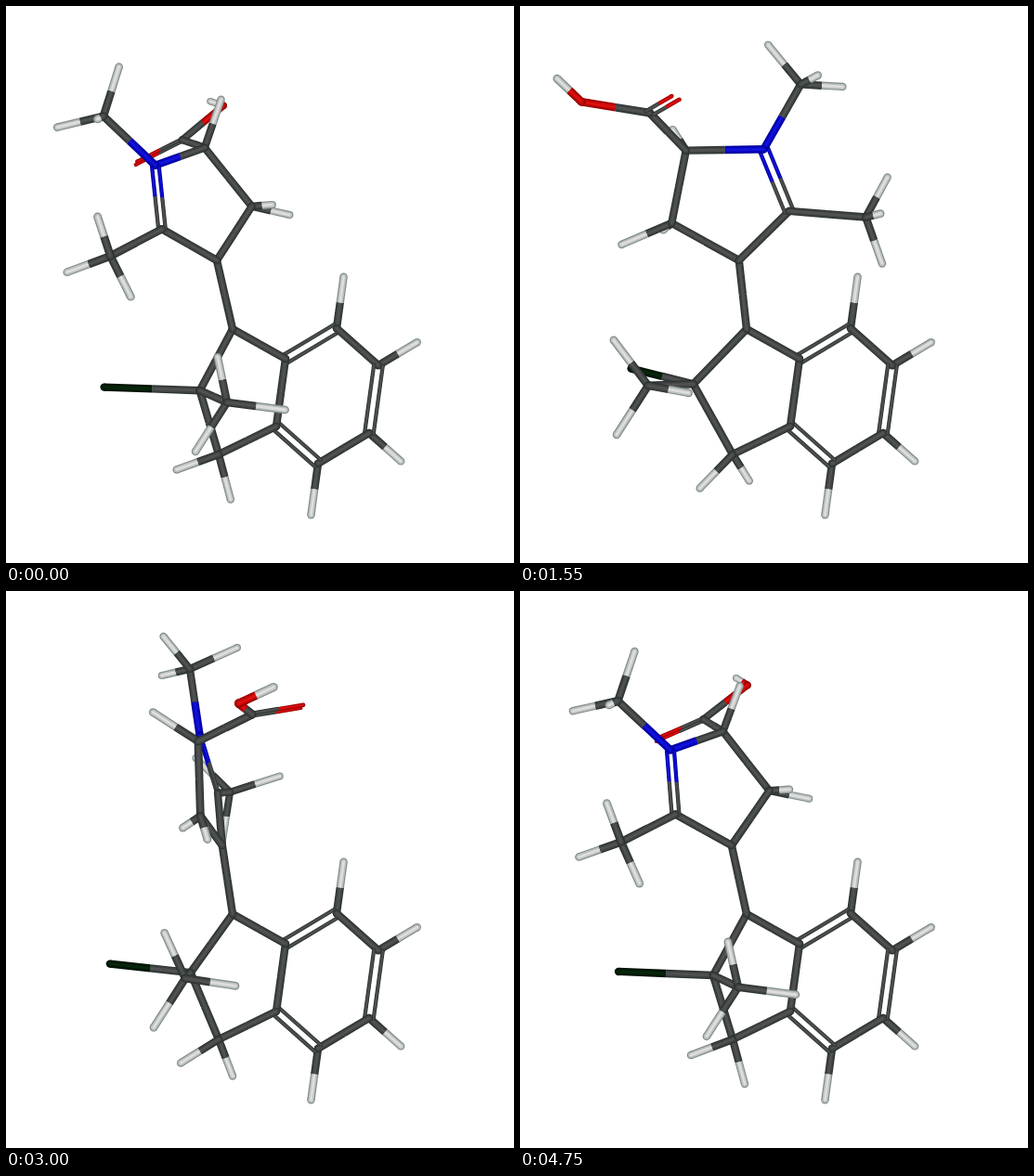
Animation, 547 px wide and 600 px high, one loop 4800 ms. Source, as an HTML page with a canvas:

```html
<!DOCTYPE html>
<html lang="en">
<head>
<meta charset="utf-8">
<title>Rotating molecule</title>
<style>
  html, body { margin: 0; width: 100%; height: 100%; overflow: hidden; background: #fff; }
  canvas { display: block; }
</style>
</head>
<body>
<canvas id="stage" width="547" height="600"></canvas>
<script>
const ctx = document.getElementById("stage").getContext("2d");
const LOOP = 4800, STEP = 50, RAD = Math.PI / 180;

// Edge, body and highlight colours
const paint = {
  C: ["#2b3232", "#404343", "#505252"],
  H: ["#7f8c8c", "#bec0c0", "#dedede"],
  N: ["#000098", "#0606c0", "#1212da"],
  O: ["#900000", "#c00505", "#dc1010"],
  Cl: ["#001004", "#021a06", "#08260c"]
};

// Key points of the few motions that drive the whole molecule
const keyTimes = [0, 1150, 1900, 2500, 3500, 4050];
const motions = {
  drift: [-1, 23, 11, -2, -2, 14],              // degrees ahead of an even turn
  roll: [-0.45, 0.12, -0.05, -0.2, -0.18, -0.06], // lean of the upper ring
  sway: [-17, -6, -11, -14, -5, 4],             // foot of the upper ring
  tilt: [0.2, 0, 0.85, 0.4, 0.25, 1],           // acid group, low to high
  flexX: [103, 25, 0, 61, 33, 12],              // methyl group of the lower ring
  flexY: [427, 404, 416, 429, 405, 414]
};

// Smooth periodic curve through the key points
function curve(values, t) {
  const n = values.length;
  const time = i => keyTimes[(i + n) % n] + LOOP * Math.floor(i / n);
  const value = i => values[(i + n) % n];
  const slope = i => {
    const before = time(i) - time(i - 1), after = time(i + 1) - time(i);
    return ((value(i) - value(i - 1)) / before * after +
            (value(i + 1) - value(i)) / after * before) / (before + after);
  };
  let i = n - 1;
  while (keyTimes[i] > t) i--;
  const span = time(i + 1) - time(i), s = (t - time(i)) / span;
  const ease = s * s * (3 - 2 * s);
  return value(i) + (value(i + 1) - value(i)) * ease +
    span * s * (1 - s) * (slope(i) * (1 - s) - slope(i + 1) * s);
}

function motionAt(t) {
  const m = {};
  for (const name in motions) m[name] = curve(motions[name], t);
  m.turn = (222 + 360 * t / LOOP + m.drift) * RAD;
  return m;
}

const atoms = [], element = {}, bonds = [];
const bond = (a, b, ref) => bonds.push({ a, b, ref });

// ref names a third atom in the plane of a double bond
function atom(name, kind, parent, place, ref) {
  atoms.push({ name, parent, place });
  element[name] = kind;
  if (parent) bond(parent, name, ref);
}

// Placement rules, each relative to the parent atom
const fixed = (x, y) => () => [x, y, 0];
const flexing = (x, y, z, gainX = 0, gainY = 0) => m =>
  [x + gainX * m.flexX, y + gainY * m.flexX, z];
const turning = (u, v, w, lift = 0) => m => {
  const c = Math.cos(m.turn), s = Math.sin(m.turn);
  const x = u * c + w * s, y = v + lift * m.tilt;
  const cr = Math.cos(m.roll), sr = Math.sin(m.roll);
  return [x * cr + y * sr, x * sr - y * cr, w * c - u * s];
};

// Three hydrogens around the outward direction (u, v)
function methyl(parent, u, v, phase) {
  for (let i = 0; i < 3; i++) {
    const angle = (phase + 120 * i) * RAD, across = 54 * Math.cos(angle);
    atom(parent + i, "H", parent,
      turning(19 * u + across * v, 19 * v - across * u, 54 * Math.sin(angle)));
  }
}

// Benzene ring: a hexagon seen at an angle
const hexagon = (i, k) => {
  const c = k * Math.cos(i * 60 * RAD), s = k * Math.sin(i * 60 * RAD);
  return [-45 * c + 37.5 * s, -40 * c - 61 * s];
};
for (let i = 0; i < 6; i++) {
  const [x, y] = hexagon(i, 1);
  atom("r" + i, "C", "", fixed(346 + x, 420 + y));
  if (i > 0 && i < 5) atom("h" + i, "H", "r" + i, fixed(...hexagon(i, 0.76)));
}
for (let i = 0; i < 6; i++)
  bond("r" + i, "r" + (i + 1) % 6, i % 2 ? "" : "r" + (i + 2) % 6);

// Lower ring
atom("hub", "C", "", fixed(244, 348));
atom("q", "C", "", flexing(186, 407, 0, 0.22, 0.07));
atom("b", "C", "", fixed(229, 483));
atom("cl", "Cl", "q", flexing(-66, -17, -25, -0.36, 0.13));
atom("m", "C", "", m => [135 + m.flexX, m.flexY, 45]);
atom("m0", "H", "m", flexing(-38, -49, 10, 0.27));
atom("m1", "H", "m", flexing(43, 8, 20, 0.19));
atom("m2", "H", "m", flexing(-34, 53, 10));
atom("b0", "H", "b", flexing(-35, 37, 20, -0.1, -0.2));
atom("b1", "H", "b", flexing(18, 28, -15, -0.05, 0.2));
bond("hub", "r0");
bond("hub", "q");
bond("q", "m");
bond("q", "b");
bond("b", "r5");

// Upper ring
atom("c3", "C", "", m => [244 + m.sway, 274, 0]);
atom("c2", "C", "c3", turning(51, 56, 0));
atom("n", "N", "c2", turning(-31, 65, 0), "c3");
atom("cb", "C", "c3", turning(-75, 36, -4));
atom("ca", "C", "cb", turning(12, 79, 14));
atom("k", "C", "c2", turning(83, -2, 0));
atom("p", "C", "n", turning(36, 72, 0));
atom("cb0", "H", "cb", turning(-52, -26, 10));
atom("cb1", "H", "cb", turning(-10, -8, -20));
methyl("k", 1, 0, 215);
methyl("p", 0.45, 0.9, -45);
bond("hub", "c3");
bond("ca", "n");

// Acid group
atom("ha", "H", "ca", turning(-18, 50, -38, -55));
atom("x", "C", "ca", turning(-37, 5, 70, 65));
atom("o1", "O", "x", turning(30, -13, 50, 60), "ca");
atom("o2", "O", "x", turning(-74, 18, 0, -20));
atom("ho", "H", "o2", turning(-25, 2, 45, 42));

const add = (a, b, k = 1) => a.map((v, i) => v + k * b[i]);
const dot = (a, b) => a.reduce((s, v, i) => s + v * b[i], 0);

function poseAt(t) {
  const motion = motionAt(t), pose = {};
  for (const { name, parent, place } of atoms)
    pose[name] = add(pose[parent] || [0, 0, 0], place(motion));
  return pose;
}

function halfStick(tip, middle, kind, size) {
  const width = size * (1 + tip[2] / 2000);
  [1, 0.72, 0.32].forEach((k, i) => {
    ctx.strokeStyle = ctx.fillStyle = paint[kind][i];
    ctx.lineWidth = width * k;
    ctx.beginPath();
    ctx.moveTo(tip[0], tip[1]);
    ctx.lineTo(middle[0], middle[1]);
    ctx.stroke();
    ctx.beginPath();
    ctx.arc(tip[0], tip[1], width * k / 2, 0, 7);
    ctx.fill();
  });
}

function stick(a, b, kindA, kindB, size) {
  const middle = add(a, b).map(v => v / 2);
  const ends = [[a, kindA], [b, kindB]].sort((p, q) => p[0][2] - q[0][2]);
  for (const [tip, kind] of ends) halfStick(tip, middle, kind, size);
}

function drawBond({ a, b, ref }, pose) {
  const A = pose[a], B = pose[b];
  if (!ref) return stick(A, B, element[a], element[b], 8.4);
  // Two thin sticks side by side in the plane of the group
  const along = add(B, A, -1), side = add(pose[ref], A, -1);
  const across = add(side, along, -dot(side, along) / dot(along, along));
  const shift = 4.8 / Math.hypot(...across);
  for (const s of [shift, -shift])
    stick(add(A, across, s), add(B, across, s), element[a], element[b], 4.2);
}

let shown = -1;
function frame() {
  const t = Math.floor(performance.now() / STEP) * STEP % LOOP;
  if (t !== shown) {
    shown = t;
    const pose = poseAt(t);
    const depth = ({ a, b }) => pose[a][2] + pose[b][2];
    ctx.fillStyle = "#fff";
    ctx.fillRect(0, 0, 547, 600);
    [...bonds].sort((p, q) => depth(p) - depth(q)).forEach(b => drawBond(b, pose));
  }
  requestAnimationFrame(frame);
}
frame();
</script>
</body>
</html>
```
